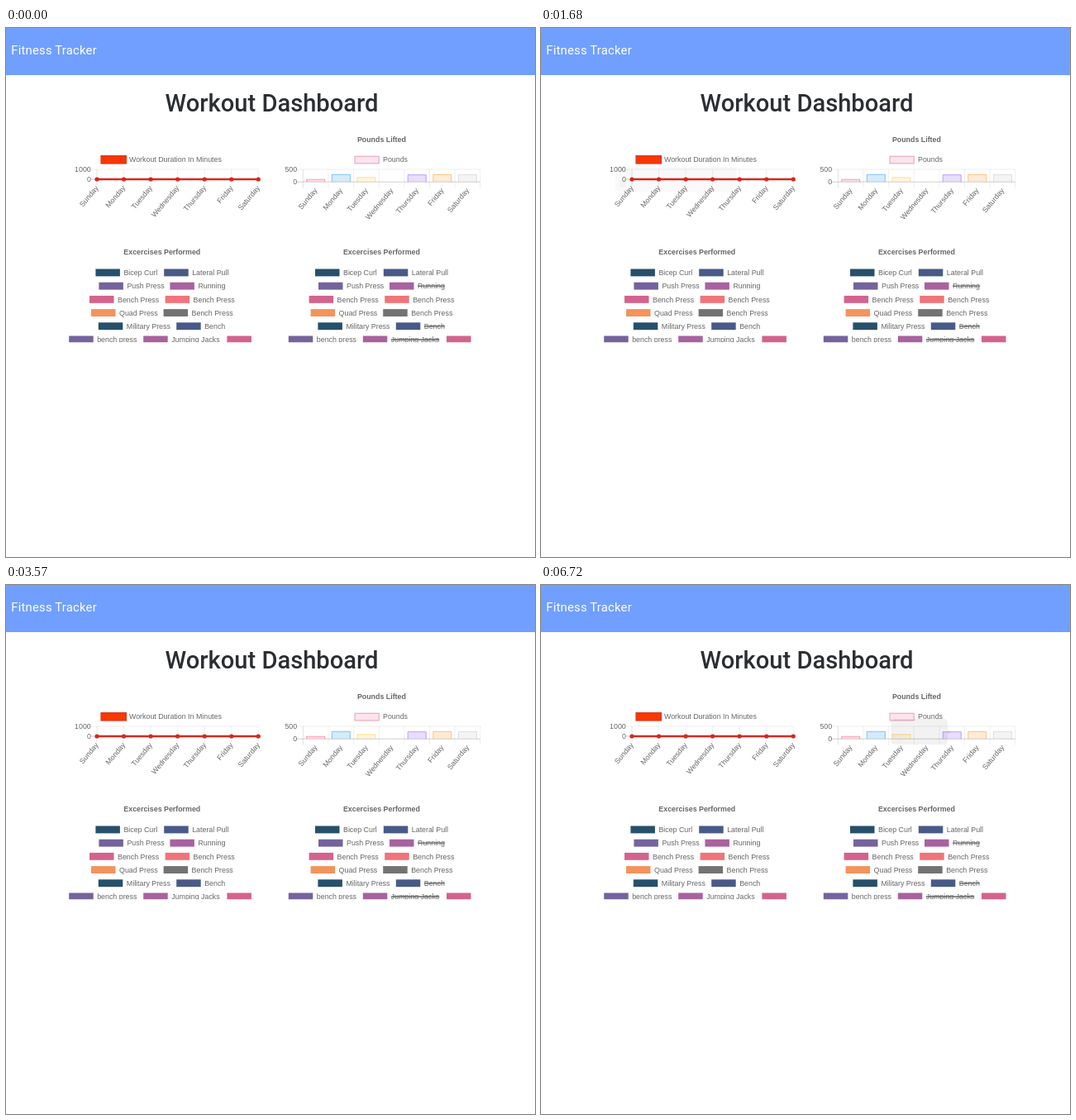
An HTML page that plays this animation: 640x640 px, repeating every 6790 ms.

```html
<!DOCTYPE html>
<html lang="en">
<head>
<meta charset="utf-8">
<title>Workout Dashboard</title>
<style>
  html, body { margin: 0; width: 100%; height: 100%; overflow: hidden; background: #fff; }
  svg { display: block; width: 100vw; height: 100vh; }
  text { font: 8.86px "Liberation Sans", Arial, sans-serif; fill: #666; }
  .bold { font-weight: 700; }
  .brand { font: 14.8px Roboto, sans-serif; letter-spacing: .22px; fill: #fff; }
  .head { font: 500 29.1px Roboto, sans-serif; fill: #2b2e32; }
  .tip text { fill: #fff; }
</style>
</head>
<body>
<svg id="stage" viewBox="0 0 640 640">
  <defs><clipPath id="cut"><rect y="250" width="640" height="130.3"/></clipPath></defs>
</svg>
<script>
const LOOP = 6790, STEP = 70, FADE = 400;
const DAYS = ['Sunday', 'Monday', 'Tuesday', 'Wednesday', 'Thursday', 'Friday', 'Saturday'];
const stage = document.getElementById('stage');

function add(parent, tag, attrs, content) {
  const el = document.createElementNS('http://www.w3.org/2000/svg', tag);
  for (const k in attrs) el.setAttribute(k, attrs[k]);
  if (content !== undefined) el.textContent = content;
  parent.appendChild(el);
  return el;
}
const rect = (p, x, y, width, height, fill, more) => add(p, 'rect', { x, y, width, height, fill, ...more });
const line = (p, x1, y1, x2, y2, stroke, width = 0.75) =>
  add(p, 'line', { x1, y1, x2, y2, stroke, 'stroke-width': width });
const text = (p, x, y, str, more) => add(p, 'text', { x, y, ...more }, str);
const mid = { 'text-anchor': 'middle' }, end = { 'text-anchor': 'end' };

// Page
rect(stage, 0, 0, 640, 57, '#709fff');
text(stage, 6.3, 32.3, 'Fitness Tracker', { class: 'brand' });
text(stage, 321.5, 101, 'Workout Dashboard', { class: 'head', ...mid });

function axes(left, right, top, zero, max, gap) {
  for (let i = 0; i <= (right - left) / gap + 0.01; i++) {
    const x = left + i * gap;
    line(stage, x, top, x, zero + 7.4, i ? 'rgba(0,0,0,.09)' : 'rgba(0,0,0,.16)');
  }
  line(stage, left - 7.4, top, right, top, 'rgba(0,0,0,.1)');
  line(stage, left - 7.4, zero, right, zero, 'rgba(0,0,0,.25)');
  text(stage, left - 7.2, top + 3.1, max, end);
  text(stage, left - 7.2, zero + 3.1, 0, end);
}
function dayLabels(x0, gap, y) {
  DAYS.forEach((day, i) => text(stage, 0, 3, day,
    { ...end, transform: `translate(${x0 + i * gap} ${y}) rotate(-50)` }));
}

// Duration line chart
const LX = 110, LGAP = 32.55, LY = 183;
const dotX = i => LX + i * LGAP;
rect(stage, 115, 154.6, 30.4, 9.4, '#fc3600', { stroke: '#d63a20', 'stroke-width': 1.2 });
text(stage, 149, 162.4, 'Workout Duration In Minutes');
axes(LX, dotX(6), 171, LY, 1000, LGAP);
dayLabels(LX, LGAP, 192);
line(stage, LX, LY, dotX(6), LY, '#d42b20', 2.3);
const dots = DAYS.map((d, i) => add(stage, 'circle', { cx: dotX(i), cy: LY, r: 2.6, fill: '#d4281f' }));

// Pounds bar chart
const BX = 359.4, BGAP = 30.62, BY = 186.2;
const POUNDS = [100, 300, 180, 0, 285, 295, 290];
const HUES = ['255,99,132', '54,162,235', '255,206,86', '75,192,192', '153,102,255', '255,159,64', '201,203,207']
  .map(c => `rgb(${c})`);
const barX = i => BX + (i + 0.5) * BGAP;
const barTop = i => BY - POUNDS[i] * 0.0298;
text(stage, 454.4, 138, 'Pounds Lifted', { class: 'bold', ...mid });
rect(stage, 422, 155.2, 29.2, 8.7, '#fde4ec', { stroke: '#e3a0b2', 'stroke-width': 1 });
text(stage, 456, 162.4, 'Pounds');
axes(BX, BX + 7 * BGAP, 171, BY, 500, BGAP);
dayLabels(BX + BGAP / 2, BGAP, 195);
const bars = POUNDS.map((v, i) => {
  const w = 0.72 * BGAP, x = barX(i) - w / 2;
  return add(stage, 'path', {
    d: v ? `M${x} ${BY}V${barTop(i)}h${w}V${BY}` : '', fill: HUES[i], stroke: HUES[i], 'stroke-width': 0.8
  });
});

// Exercise legends, cut off at the bottom
const TONES = ['#26506b', '#495a88', '#74639d', '#a8629f', '#d3638d', '#f0747a', '#f4935b', '#737373'];
const ITEMS = [
  [108.4, 'Bicep Curl'], [191.2, 'Lateral Pull'],
  [112.4, 'Push Press'], [198.4, 'Running'],
  [101, 'Bench Press'], [192.6, 'Bench Press'],
  [103, 'Quad Press'], [190.6, 'Bench Press'],
  [111.8, 'Military Press'], [206.2, 'Bench'],
  [76.2, 'bench press'], [166.2, 'Jumping Jacks'], [267.4, '']
];
const STRUCK = ['Running', 'Bench', 'Jumping Jacks'];
function legend(dx, strike) {
  const g = add(stage, 'g', { 'clip-path': 'url(#cut)' });
  text(g, 188.8 + dx, 274.4, 'Excercises Performed', { class: 'bold', ...mid });
  ITEMS.forEach(([x, name], i) => {
    const y = 296 + Math.min(i >> 1, 5) * 16.2;
    rect(g, x + dx, y - 4.5, 29.5, 8.9, TONES[i % 8]);
    const label = text(g, x + dx + 34, y + 3.1, name);
    if (strike && STRUCK.includes(name))
      line(g, x + dx + 34, y, x + dx + 34 + label.getComputedTextLength(), y, '#666', 1.3);
  });
}
legend(0, false);
legend(265.6, true);

// Tooltips: early days open to the right of their mark, late days to the left
function makeTip(width, gap, markX, markY, hovers) {
  const g = add(stage, 'g', { class: 'tip' });
  const caret = add(g, 'path', { fill: '#000' });
  const box = rect(g, 0, 0, width, 31, '#000', { rx: 4.4 });
  const swatch = rect(g, 5.4, 18.3, 6.9, 6.9, 'none', { 'stroke-width': 0.8 });
  const parts = [
    g.insertBefore(rect(g, 4.4, 17.3, 8.9, 8.9, '#fff'), swatch),
    swatch,
    text(g, 4.4, 11.4, '', { class: 'bold' }),
    text(g, 14.7, 24.9, '')
  ];
  const place = i => ({
    x: i < 3 ? markX(i) + gap : markX(i) - gap - width,
    y: markY(i) - 15.6
  });
  return { g, caret, box, parts, width, place, hovers };
}

// Hovers: time in, time out, day
const lineTip = makeTip(146.5, 3.8, dotX, () => LY, [[950, 1450, 4], [1950, 2450, 5], [2978, 3260, 6]]);
const barTip = makeTip(68.6, 5.2, barX, barTop, [[3650, 4162, 1], [4650, 5130, 2], [5770, 6526, 4]]);

const ease = ms => 1 - (1 - Math.min(1, Math.max(0, ms / FADE))) ** 4;

function hover(tip, t) {
  const n = tip.hovers.filter(h => h[0] <= t).length - 1;
  if (n < 0) return { a: 0 };
  const [start, stop, day] = tip.hovers[n];
  const to = tip.place(day), from = n ? tip.place(tip.hovers[n - 1][2]) : to;
  const k = ease(t - start);
  return {
    day, on: t < stop,
    x: from.x + (to.x - from.x) * k,
    y: from.y + (to.y - from.y) * k,
    a: ease(Math.min(t, stop) - start) * (1 - ease(t - stop))
  };
}
function drawTip(tip, s, body, hue, fade) {
  tip.g.setAttribute('display', s.a > 0.004 ? 'inline' : 'none');
  if (!s.a) return;
  const [, swatch, head, row] = tip.parts;
  const w = tip.width;
  tip.g.setAttribute('transform', `translate(${s.x} ${s.y})`);
  tip.caret.setAttribute('d', s.day < 3 ? 'M0 11.8l-3.7 3.7l3.7 3.7Z' : `M${w} 11.8l3.7 3.7l-3.7 3.7Z`);
  for (const el of [tip.caret, tip.box]) el.setAttribute('opacity', s.a * 0.74);
  for (const el of tip.parts) el.setAttribute('opacity', s.a);
  swatch.setAttribute('stroke', hue);
  swatch.setAttribute('fill', hue);
  swatch.setAttribute('fill-opacity', fade);
  head.textContent = DAYS[s.day];
  row.textContent = body;
}

function draw(t) {
  const l = hover(lineTip, t), b = hover(barTip, t);
  dots.forEach((dot, i) => dot.setAttribute('r', l.on && i === l.day ? 3.4 : 2.6));
  bars.forEach((bar, i) => {
    const hot = b.on && i === b.day;
    bar.setAttribute('fill-opacity', hot ? 0.26 : 0.21);
    bar.setAttribute('stroke-opacity', hot ? 1 : 0.75);
  });
  drawTip(lineTip, l, 'Workout Duration In Minutes: 20', '#e0291c', 1);
  drawTip(barTip, b, 'Pounds: ' + POUNDS[b.day], HUES[b.day], 0.2);
}

function tick(now) {
  draw(Math.floor((now % LOOP) / STEP) * STEP);
  requestAnimationFrame(tick);
}
draw(0);
requestAnimationFrame(tick);
</script>
</body>
</html>
```
